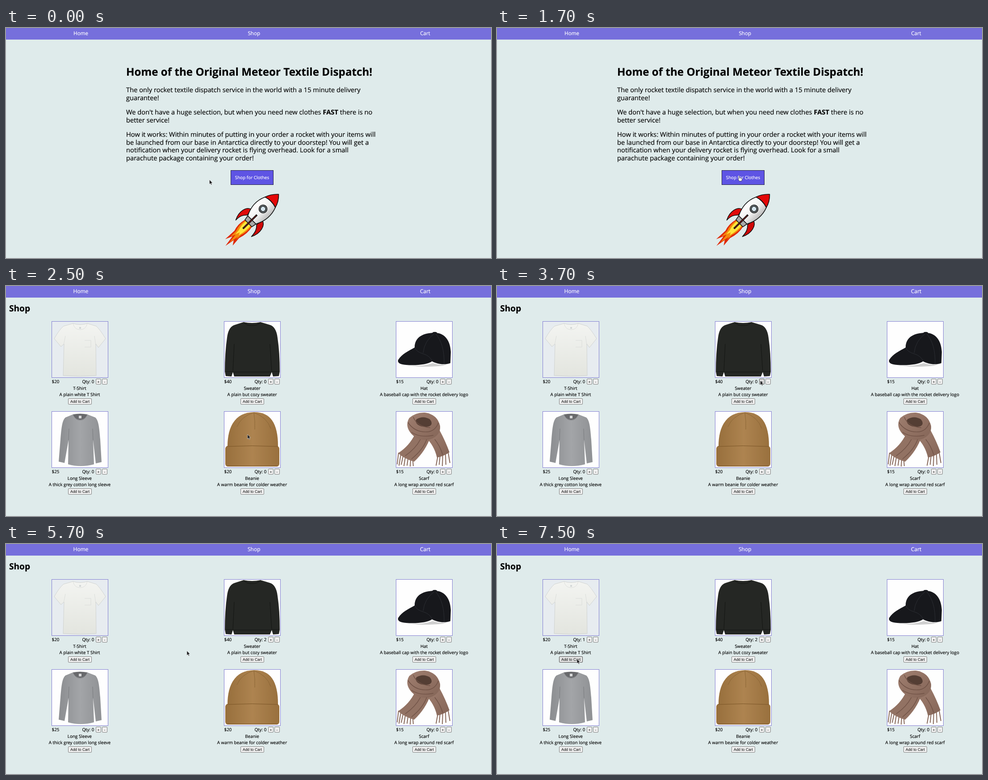
An HTML page for the animation above (8 s loop, 1086 by 516 pixels).

```html
<!DOCTYPE html>
<html lang="en">
<head>
<meta charset="utf-8">
<title>Clothes shop</title>
<style>
  html, body { margin: 0; width: 100%; height: 100%; overflow: hidden; background: #dfebeb; }
  svg { display: block; width: 1086px; height: 516px; }
  text { font-family: "Open Sans", "Noto Sans", sans-serif; font-size: 9.87px; text-rendering: geometricPrecision; white-space: pre; fill: currentColor; stroke: currentColor; stroke-width: .18px; }
  .mid { text-anchor: middle; }
  .nav, .light { color: #fff; }
  .nav text { font-size: 11.65px; text-anchor: middle; }
  .shopping .nav text { font-size: 12px; }
  .copy text { font-size: 14.69px; }
  .copy .title { font-size: 24.2px; font-weight: 700; }
  .title { font-size: 19.1px; font-weight: 700; }
  .bold { font-weight: 700; }
  .btn rect { fill: #efefef; stroke: #828282; }
  .btn text { font-family: "Liberation Sans", Arial, sans-serif; font-size: 8.53px; text-anchor: middle; stroke: none; }
  .btn.hover rect { fill: #e2e2e2; stroke: #505050; }
  .btn.active rect { fill: #f5f5f5; stroke: #8d8d8d; }
  .frame { fill: none; stroke: #827dd2; }
</style>
</head>
<body>
<svg id="stage" viewBox="0 0 1086 516">
  <defs>
    <linearGradient id="white" x2="0" y2="1"><stop stop-color="#f3f4f1"/><stop offset="1" stop-color="#e3e5df"/></linearGradient>
    <linearGradient id="grey"><stop stop-color="#8b8d90"/><stop offset=".5" stop-color="#a3a5a8"/><stop offset="1" stop-color="#8f9194"/></linearGradient>
    <linearGradient id="hull"><stop stop-color="#fff"/><stop offset=".55" stop-color="#f1f1f1"/><stop offset="1" stop-color="#bcbcbc"/></linearGradient>
    <linearGradient id="wool" x2="1" y2="1"><stop stop-color="#a07f70"/><stop offset="1" stop-color="#846557"/></linearGradient>
    <linearGradient id="tan"><stop stop-color="#9c7340"/><stop offset=".5" stop-color="#b58a56"/><stop offset="1" stop-color="#9d7441"/></linearGradient>
    <pattern id="knit" width="3" height="4" patternUnits="userSpaceOnUse"><path d="M0 1H2M1 3H3" stroke="#7d5728" stroke-width=".8" opacity=".5"/></pattern>
    <clipPath id="crop"><rect width="125" height="125"/></clipPath>

    <g id="tshirt">
      <rect width="125" height="125" fill="#e7ecf0"/>
      <path d="M47 4Q63 9 79 4L99 10Q107 17 120 38L104 58L98 50L99 121Q63 124 25 121L27 50L20 56L5 38Q17 17 26 10Z" fill="url(#white)" stroke="#c9ccca" stroke-width=".8"/>
      <path d="M47 4Q50 18 63 18Q76 18 79 4M26 52L30 32M98 52L95 32M73 42H87V57H73" fill="none" stroke="#d6d9d6" stroke-width=".8"/>
      <rect x="61" y="12" width="4" height="4" fill="#d3d7d7"/>
    </g>
    <g id="sweater">
      <rect width="125" height="125" fill="#fefefe"/>
      <path d="M43 1Q62 5 81 1L101 7Q116 11 119 36Q124 70 124 112L122 122L109 123L106 113L102 123H22L19 113L16 123L3 122L1 112Q1 70 6 36Q9 11 24 7Z" fill="#252724"/>
      <path d="M43 1Q48 9 62 9Q76 9 81 1M22 50L19 112M102 50L106 112M19 113H105M2 112H18M107 112H123" fill="none" stroke="#131512"/>
    </g>
    <g id="cap">
      <rect width="125" height="125" fill="#fefefe"/>
      <path d="M18 97Q50 103 82 93Q105 100 119 95L104 99Q50 104 18 97Z" fill="#cfcfcf"/>
      <path d="M41 58C41 34 61 25 86 25C109 25 121 43 122 68L121 93C106 98 92 95 80 89C70 96 45 99 22 97C8 96 2 92 4 86C13 72 27 66 41 58Z" fill="#17181c"/>
      <ellipse cx="86" cy="25" rx="5" ry="2" fill="#17181c"/>
      <path d="M85 27Q63 43 60 70M88 27Q108 50 107 95M41 58Q45 68 60 72Q76 77 80 89" fill="none" stroke="#2c2e34"/>
    </g>
    <g id="longsleeve">
      <rect width="125" height="125" fill="#fefefe"/>
      <path d="M47 6Q63 15 79 6L97 13C105 20 106 40 108 62L111 113L98 116L92 64L94 118Q64 126 36 118L37 64L28 115L15 112L19 62C21 40 22 20 30 13Z" fill="url(#grey)"/>
      <path d="M47 6Q63 3 79 6Q74 18 63 18Q52 18 47 6Z" fill="#68696c"/>
      <path d="M47 6Q52 19 63 19Q74 19 79 6M37 64L38 38M92 64L91 38" fill="none" stroke="#797b7e"/>
      <rect x="60" y="9" width="6" height="6" fill="#d6d7d8"/>
    </g>
    <g id="beanie">
      <rect width="125" height="125" fill="#fefefe"/>
      <path d="M7 82C6 27 29 1 67 1C104 1 121 27 120 82Z" fill="url(#tan)"/>
      <path d="M7 82C6 27 29 1 67 1C104 1 121 27 120 82Z" fill="url(#knit)"/>
      <path d="M66 2Q69 20 68 40M66 2Q38 10 28 34M66 2Q95 12 104 38" fill="none" stroke="#8a6535"/>
      <rect x="2" y="77" width="121" height="46" rx="6" fill="url(#tan)"/>
      <rect x="2" y="77" width="121" height="46" rx="6" fill="url(#knit)"/>
      <path d="M5 78Q62 75 120 78M6 122H119" fill="none" stroke="#7b5527"/>
    </g>
    <g id="scarf">
      <rect width="125" height="125" fill="#fefefe"/>
      <path d="M5 92L2 118M10 96L6 121M15 100L11 119M20 103L17 122M26 106L24 121M32 109L31 123M37 110L38 122M93 99L89 121M98 98L96 119M104 96L103 122M110 94L111 119M116 91L120 115" stroke="#87685a" stroke-width="2"/>
      <path d="M76 40L97 42Q110 66 119 91Q106 100 91 103Q85 76 66 58Z" fill="url(#wool)"/>
      <path d="M42 50L77 55Q66 88 40 112Q18 106 4 93Q29 77 42 50Z" fill="#927263"/>
      <path d="M29 14Q44 1 64 2Q92 6 98 32Q100 53 76 62Q50 67 34 50Q18 32 29 14Z" fill="url(#wool)"/>
      <path d="M45 17Q60 8 75 17Q84 28 73 33Q58 36 48 29Q41 23 45 17Z" fill="#543e34"/>
      <path d="M26 24Q42 48 72 45Q88 42 94 25M34 46Q52 59 83 53M38 12Q46 33 76 36M54 62Q43 83 20 99M68 62Q60 85 34 106M86 62Q98 77 104 97" fill="none" stroke="#6f5145" stroke-width="1.4"/>
    </g>

    <path id="arrow" d="M0 0V10L2.3 8L4 11.6L5.6 10.9L4 7.4L7 7.2Z" fill="#1d1d1f" stroke="#f4f4f4" stroke-width=".6"/>
    <path id="hand" d="M0 1Q1-.6 2 1V4.6Q3 3.8 3.8 4.8Q4.8 4.2 5.4 5.1Q7 4.8 7 6.3V8.5L6 11.5H1.2L-1.6 7.6Q-1.6 6.2 0 7Z" fill="#fff" stroke="#222" stroke-width=".7"/>
  </defs>

  <rect width="1086" height="516" fill="#dfebeb"/>
  <g class="nav">
    <rect width="1086" height="26" fill="#766fdc"/>
    <text x="167.6" y="15.8">Home</text><text x="555.3" y="15.8">Shop</text><text x="938.6" y="15.8">Cart</text>
  </g>

  <g id="home">
    <g class="copy">
      <text class="title" x="269" y="107.3">Home of the Original Meteor Textile Dispatch!</text>
      <text x="269" y="144">The only rocket textile dispatch service in the world with a 15 minute delivery</text>
      <text x="269" y="161.6">guarantee!</text>
      <text x="269" y="194.1">We don't have a huge selection, but when you need new clothes <tspan class="bold">FAST</tspan> there is no</text>
      <text x="269" y="211.6">better service!</text>
      <text x="269" y="244.2">How it works: Within minutes of putting in your order a rocket with your items will</text>
      <text x="269" y="261.8">be launched from our base in Antarctica directly to your doorstep! You will get a</text>
      <text x="269" y="279.4">notification when your delivery rocket is flying overhead. Look for a small</text>
      <text x="269" y="297">parachute package containing your order!</text>
    </g>
    <rect x="503.5" y="319.5" width="95" height="32" fill="#5e54e4" stroke="#25233f"/>
    <text class="mid light" x="551" y="339.4">Shop for Clothes</text>

    <g transform="translate(547 434) rotate(45.5)" stroke="#111" stroke-width="1.6" stroke-linejoin="round">
      <g stroke="none">
        <path d="M-11 5Q-16 24-10 40L-11 68L-4 52L0 78L4 56L11 66L9 44Q16 24 11 5Z" fill="#df2a08"/>
        <path d="M-9 5Q-13 22-7 38L-7 56L-2 44L1 66L5 44L7 52L7 36Q12 22 9 5Z" fill="#f58a0b"/>
        <path d="M-7 5Q-9 20-4 32L-3 44L1 34L4 40Q9 20 7 5Z" fill="#ffe63b"/>
      </g>
      <path d="M-17-21C-30-18-35 2-25 21C-25 8-22 1-15-5Z" fill="#e00a0a"/>
      <path d="M17-21C30-18 36 2 26 22C25 8 22 1 15-5Z" fill="#d00808"/>
      <path d="M-13-5H13L11 6H-11Z" fill="#a9a9a9"/>
      <path d="M-13-5C-23-24-24-44-16-62Q0-67 17-62C24-44 23-24 13-5Z" fill="url(#hull)"/>
      <path d="M-16-62Q0-68 17-62Q13-77 1-88Q-11-77-16-62Z" fill="#e40808"/>
      <path d="M0-21V23" stroke-width="4"/>
      <path d="M0-19V21" stroke="#8d1717" stroke-width="1.2"/>
      <circle cy="-40" r="9" fill="#8b959b"/>
      <circle cy="-40" r="6" fill="#d5e5ee"/>
    </g>
  </g>

  <g id="shop"><text class="title" x="7" y="56.6">Shop</text></g>
  <use id="cursor"/>
</svg>
<script>
  const NS = 'http://www.w3.org/2000/svg';
  const $ = id => document.getElementById(id);
  const LOOP = 8000, STEP = 100, SHOP_AT = 2400, PHOTOS_AT = 2500;
  const shop = $('shop'), home = $('home'), cursor = $('cursor');

  function add(parent, tag, attrs, content) {
    const el = document.createElementNS(NS, tag);
    for (const key in attrs) el.setAttribute(key, attrs[key]);
    if (content !== undefined) el.textContent = content;
    return parent.appendChild(el);
  }

  function button(x, y, w, h, label) {
    const el = add(shop, 'g', { class: 'btn' });
    add(el, 'rect', { x, y, width: w, height: h, rx: 1.5 });
    add(el, 'text', { x: x + w / 2, y: y + h / 2 + 3 }, label);
    return { el, x, y, w, h };
  }

  const items = [
    ['tshirt', 'T-Shirt', 20, 'A plain white T Shirt'],
    ['sweater', 'Sweater', 40, 'A plain but cozy sweater'],
    ['cap', 'Hat', 15, 'A baseball cap with the rocket delivery logo'],
    ['longsleeve', 'Long Sleeve', 25, 'A thick grey cotton long sleeve'],
    ['beanie', 'Beanie', 20, 'A warm beanie for colder weather'],
    ['scarf', 'Scarf', 15, 'A long wrap around red scarf']
  ];

  const cards = items.map(([art, name, price, note], i) => {
    const x = Math.round(i % 3 * 385.6), y = Math.floor(i / 3) * 202;
    const mid = x + 165;
    add(shop, 'rect', { x: x + 102, y: y + 79, width: 127, height: 127, fill: '#c6b6f7' });
    const photo = add(shop, 'use', { href: '#' + art, transform: `translate(${x + 103} ${y + 80})`, 'clip-path': 'url(#crop)' });
    add(shop, 'rect', { class: 'frame', x: x + 102.5, y: y + 79.5, width: 126, height: 126 });
    add(shop, 'text', { x: x + 102.6, y: y + 218 }, '$' + price);
    const qty = add(shop, 'text', { x: x + 170.4, y: y + 218 });
    add(shop, 'text', { class: 'mid', x: mid, y: y + 233 }, name);
    add(shop, 'text', { class: 'mid', x: mid, y: y + 247.4 }, note);
    const plus = button(x + 201.5, y + 208.5, 11, 12, '+');
    button(x + 215.5, y + 208.5, 11, 12, '-');
    const buy = button(x + 139.5, y + 252.5, 52, 13, 'Add to Cart');
    return { photo, qty, plus, buy };
  });

  // Pointer track: time, x, y
  const track = [
    [0, 455.5, 340.5], [400, 455.5, 340.5], [600, 446, 354], [800, 438.5, 369], [950, 448, 371],
    [1300, 503, 359], [1500, 528, 342], [1700, 541.5, 332], [2300, 541.5, 332],
    [2400, 540.7, 333], [2900, 540.7, 333], [3000, 562, 306], [3100, 562, 306],
    [3400, 577, 258], [3700, 589.5, 212], [4300, 589.5, 212], [4900, 561, 264.3],
    [5500, 561, 264.3], [5900, 249, 215], [6000, 249, 215], [6500, 203, 213],
    [6900, 203, 213], [7100, 179, 258], [LOOP, 179, 258]
  ];

  function pointerAt(t) {
    const i = track.findIndex(k => k[0] > t);
    const [t0, x0, y0] = track[i - 1], [t1, x1, y1] = track[i];
    const f = (t - t0) / (t1 - t0);
    return [x0 + (x1 - x0) * f, y0 + (y1 - y0) * f];
  }

  const inside = ([px, py], b) => px >= b.x && px <= b.x + b.w && py >= b.y && py <= b.y + b.h;
  const link = { x: 503, y: 319, w: 96, h: 33 };
  const live = [cards[0].plus, cards[0].buy, cards[1].plus, cards[1].buy];
  const presses = [3900, 4100, 5100, 6800, 7400];

  function draw(t) {
    const shopping = t >= SHOP_AT;
    $('stage').classList.toggle('shopping', shopping);
    home.style.display = shopping ? 'none' : '';
    shop.style.display = shopping ? '' : 'none';

    const p = pointerAt(t);
    const isHand = !shopping && inside(p, link);
    cursor.setAttribute('href', isHand ? '#hand' : '#arrow');
    cursor.setAttribute('transform', `translate(${p[0]} ${p[1]})`);

    const counts = [t >= 6900 ? 1 : 0, (t >= 3900) + (t >= 4100)];
    cards.forEach((card, i) => {
      card.photo.style.display = i === 0 || t >= PHOTOS_AT ? '' : 'none';
      card.qty.textContent = 'Qty: ' + (counts[i] || 0);
    });
    const pressed = presses.includes(t);
    for (const b of live) {
      const over = inside(p, b);
      b.el.setAttribute('class', 'btn' + (over ? pressed ? ' active' : ' hover' : ''));
    }
  }

  const start = performance.now();
  function tick() {
    const t = (performance.now() - start) % LOOP;
    draw(Math.floor(t / STEP) * STEP);
    requestAnimationFrame(tick);
  }
  tick();
</script>
</body>
</html>
```
